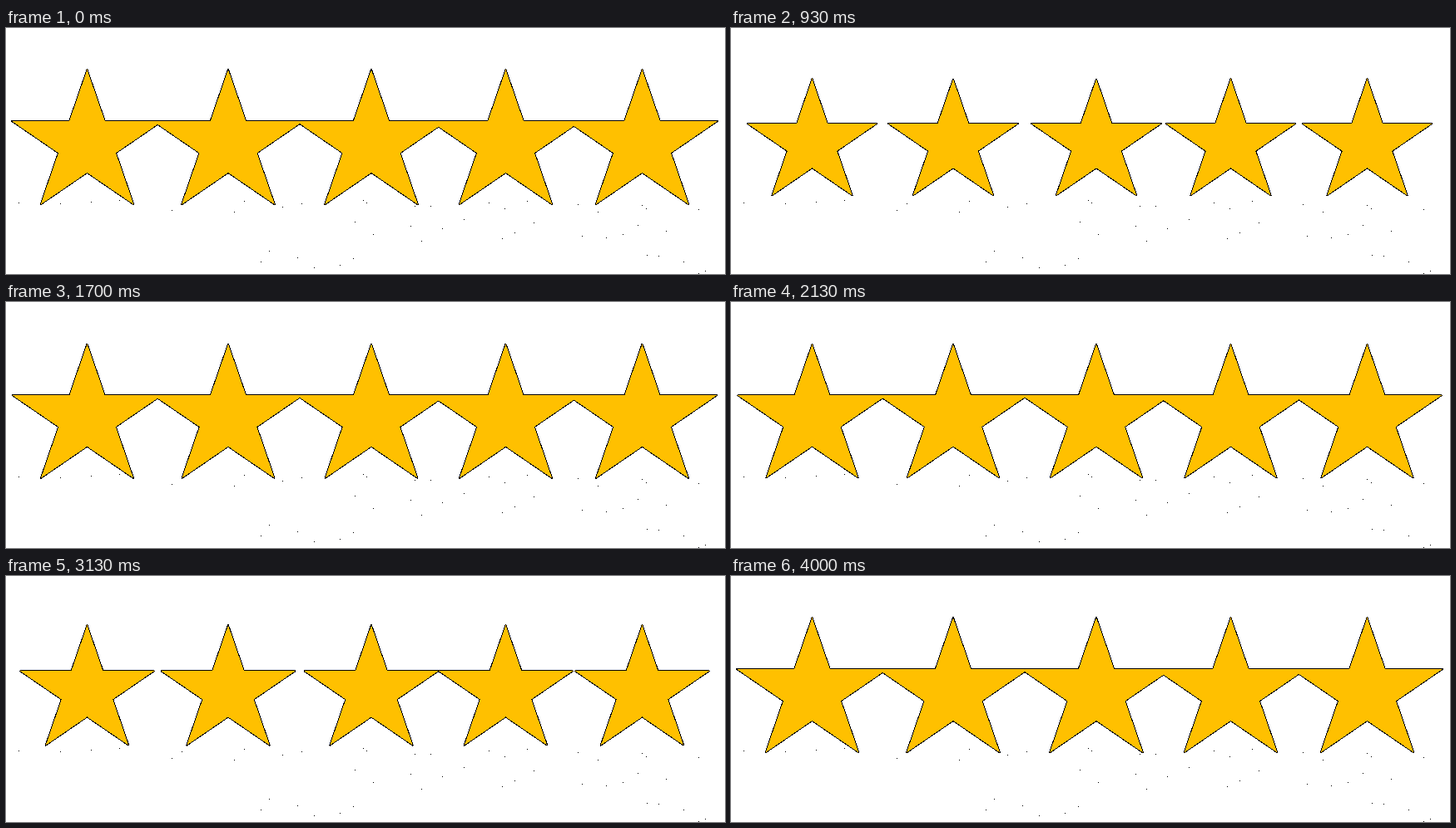
These frames come from a looping animation (864x296 px, 4030 ms). An HTML page:

```html
<!DOCTYPE html>
<html lang="en">
<head>
<meta charset="utf-8">
<title>Five pulsing stars</title>
<style>
  html, body { margin: 0; width: 100%; height: 100%; overflow: hidden; background: #fff; }
  svg { display: block; width: 864px; height: 296px; }
  #stars { fill: #ffc000; stroke: #000; stroke-width: 2; stroke-linejoin: round; paint-order: stroke; }
</style>
</head>
<body>
<svg viewBox="0 0 864 296" shape-rendering="crispEdges">
  <path id="specks"/>
  <path id="stars"/>
</svg>
<script>
const LOOP = 4030;
const PULSE_STEPS = 40;
const PEAK_STEP = 38;
const CENTERS = [97.5, 267, 439, 600.5, 764.5];
const STAR = { y: 139.8, rx: 95.2, ry: 89.8 };
const PIVOT_Y = 132.8;
const INNER_RATIO = (3 - Math.sqrt(5)) / 2;

// A regular pentagram, slightly flattened, around x = 0.
const OUTLINE = Array.from({ length: 10 }, (_, i) => {
  const angle = i * Math.PI / 5;
  const reach = i % 2 ? INNER_RATIO : 1;
  return [STAR.rx * reach * Math.sin(angle), STAR.y - STAR.ry * reach * Math.cos(angle)];
});

function seededRandom(seed) {
  return () => (seed = (seed * 16807) % 2147483647) / 2147483647;
}

// Evenly spread specks with jitter, as one path of single pixels.
function speckBand(count, left, right, top, bottom, random) {
  const slot = (right - left) / count;
  return Array.from({ length: count }, (_, i) => {
    const x = Math.floor(left + (i + random()) * slot);
    const y = Math.floor(top + random() * (bottom - top));
    return `M${x} ${y}h1v1h-1z`;
  }).join('');
}

// Steps alternate between 30 ms and 70 ms.
const stepAt = ms => 2 * Math.floor(ms / 100) + (ms % 100 >= 30 ? 1 : 0);

// A cosine pulse that lingers at full size.
function scaleAt(step) {
  const angle = 2 * Math.PI * (step - PEAK_STEP) / PULSE_STEPS;
  return 1 - 0.07 * (1 - Math.cos(angle)) + 0.0076 * (1 - Math.cos(2 * angle));
}

function starPath(cx, scale) {
  const points = OUTLINE.map(([x, y]) =>
    `${(cx + x * scale).toFixed(2)} ${(PIVOT_Y + (y - PIVOT_Y) * scale).toFixed(2)}`);
  return `M${points.join('L')}Z`;
}

const stars = document.getElementById('stars');
const random = seededRandom(2024);
document.getElementById('specks').setAttribute('d',
  speckBand(22, 15, 845, 207, 222, random) +
  speckBand(14, 400, 810, 230, 258, random) +
  speckBand(6, 285, 440, 268, 291, random) +
  speckBand(5, 765, 850, 268, 296, random));

function render(ms) {
  const scale = scaleAt(stepAt(ms % LOOP));
  stars.setAttribute('d', CENTERS.map(cx => starPath(cx, scale)).join(''));
}

function tick() {
  render(performance.now());
  requestAnimationFrame(tick);
}
tick();
</script>
</body>
</html>
```
